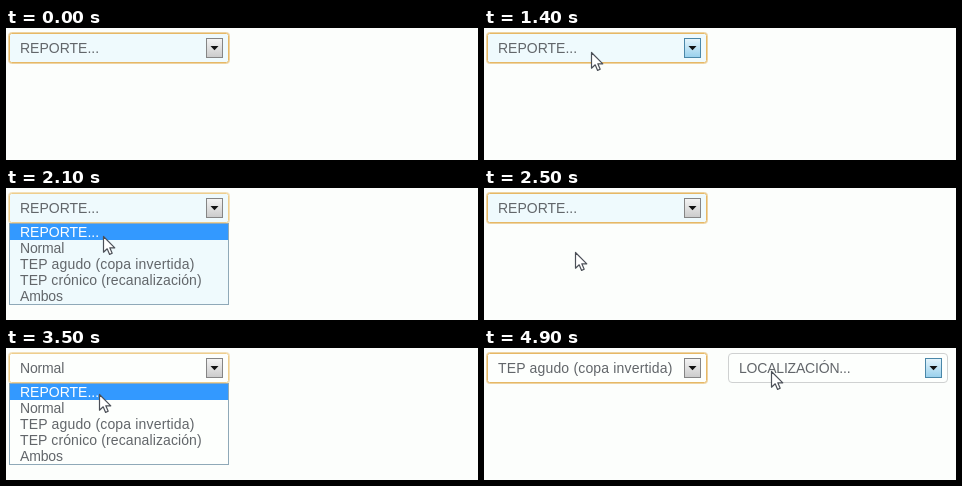
These frames come from a looping animation (472 by 132 pixels, 5000 ms). An HTML page:

```html
<!DOCTYPE html>
<html lang="es">
<head>
<meta charset="utf-8">
<title>Reporte</title>
<style>
html, body { margin: 0; width: 100%; height: 100%; overflow: hidden; background: #fcfefc; }
svg { display: block; width: 472px; height: 132px; }
text { font: 14px "Liberation Sans", Arial, sans-serif; fill: #62666a; white-space: pre; }
</style>
</head>
<body>
<svg viewBox="0 0 472 132">
  <defs>
    <linearGradient id="grey" x2="0" y2="1">
      <stop stop-color="#f4f4f4"/><stop offset="1" stop-color="#cbcbcb"/>
    </linearGradient>
    <linearGradient id="blue" x2="0" y2="1">
      <stop stop-color="#e6f5fc"/><stop offset="1" stop-color="#98d0ec"/>
    </linearGradient>
    <clipPath id="listClip"><rect id="listArea" x="2" y="35" width="223"/></clipPath>
    <clipPath id="placeClip"><rect id="placeArea" x="243" y="3" height="34"/></clipPath>
  </defs>

  <rect id="glow" x="2.5" y="4.5" width="221" height="31" rx="3" fill="none" opacity=".6"/>
  <rect id="box" x="3.5" y="5.5" width="219" height="29" rx="2"/>
  <text id="value" x="14" y="25"></text>
  <g id="button1"></g>

  <g id="place" clip-path="url(#placeClip)">
    <rect x="244.5" y="5.5" width="219" height="29" rx="3.5" fill="#fdfffd" stroke="#cfd1d1"/>
    <text x="255" y="25" letter-spacing="-.2">LOCALIZACIÓN...</text>
    <g id="button2"></g>
  </g>

  <g id="list" clip-path="url(#listClip)">
    <rect id="panel" x="3.5" y="35.5" width="219" height="81" stroke="#8fa9b8"/>
    <rect id="mark" x="4" width="218" height="16" fill="#3399ff"/>
    <g id="rows"></g>
  </g>

  <path id="cursor" d="M.5 .5V16.2L4.2 12.8L6.6 18.4L9.2 17.3L6.8 11.8H11.8Z" fill="#fff" stroke="#4c5058" stroke-width="1.2" stroke-linejoin="round"/>
</svg>
<script>
const LOOP = 5000, STEP = 100, ROW = 16, TOP = 36;
const $ = id => document.getElementById(id);
const set = (el, attrs) => { for (const k in attrs) el.setAttribute(k, attrs[k]); };
const show = (id, on) => { $(id).style.display = on ? "" : "none"; };
const ramp = (t, from, to) => Math.max(0, Math.min(1, (t - from) / (to - from)));
const mix = (a, b, p) => a + (b - a) * p;
const blend = (a, b, p) => `rgb(${a.map((v, i) => Math.round(mix(v, b[i], p)))})`;

const options = [
  ["REPORTE...", 0], ["Normal", -.15], ["TEP agudo (copa invertida)", .17],
  ["TEP crónico (recanalización)", .11], ["Ambos", -.15]
];
const rows = options.map(([label, gap], i) => {
  const row = document.createElementNS("http://www.w3.org/2000/svg", "text");
  set(row, { x: 14, y: TOP + 13 + ROW * i, "letter-spacing": gap });
  row.textContent = label;
  return $("rows").appendChild(row);
});

function makeButton(id, x) {
  $(id).innerHTML =
    `<rect x="${x + .5}" y="10.5" width="16" height="19"/>` +
    `<path d="M${x + 4.5} 18h8l-4 4.2z" fill="#111"/>`;
}
makeButton("button1", 200);
makeButton("button2", 441);
function paintButton(id, hot) {
  set($(id).firstChild, { fill: `url(#${hot ? "blue" : "grey"})`, stroke: hot ? "#4a87a8" : "#858585" });
}

// Where the pointer rests; it glides evenly in between
const rests = [
  { from: 700, to: 700, x: 130, y: 126 },
  { from: 1300, to: 1800, x: 107, y: 24 },
  { from: 2300, to: 2500, x: 91, y: 64 },
  { from: 3000, to: 3100, x: 97, y: 22 },
  { from: 4100, to: 4200, x: 86, y: 81 },
  { from: 4900, to: LOOP, x: 287, y: 23 }
];
const menus = [{ open: 1400, close: 2500 }, { open: 3100, close: 4200 }];

function pointer(t) {
  const n = Math.max(1, rests.findIndex(r => r.to > t));
  const a = rests[n - 1], b = rests[n], p = ramp(t, a.to, b.from);
  return [Math.round(mix(a.x, b.x, p)), Math.round(mix(a.y, b.y, p))];
}

function draw(t) {
  const [x, y] = pointer(t);
  const menu = menus.find(m => t >= m.open && t < m.close);
  const open = menu ? ramp(t, menu.open, menu.open + 300) : 0;
  const reveal = ramp(t, 4050, 4600);
  const chosen = menus.filter(m => t > m.close).length;
  const fill = blend([239, 250, 253], [253, 255, 253], ramp(t, 2500, 3000));
  const edge = blend([230, 184, 102], [238, 206, 142], open);

  $("value").textContent = options[chosen][0];
  set($("value"), { "letter-spacing": options[chosen][1] });
  set($("box"), { fill, stroke: edge });
  set($("glow"), { stroke: edge });
  paintButton("button1", t >= 700 && x < 224 && y < 46);
  paintButton("button2", x > 243 && y < 30);

  show("list", open > 0);
  set($("listArea"), { height: 83 * open });
  set($("panel"), { fill });
  const over = Math.floor((y - TOP) / ROW);
  const picked = rows[over] ? over : chosen;
  set($("mark"), { y: TOP + ROW * picked });
  rows.forEach((row, i) => { row.style.fill = i === picked ? "#fff" : ""; });

  show("place", reveal > 0);
  set($("placeArea"), { width: 223 * reveal });
  set($("place"), { opacity: mix(.3, 1, reveal) });

  show("cursor", t >= 700);
  set($("cursor"), { transform: `translate(${x} ${y})` });
}

const start = performance.now();
function tick() {
  const t = (performance.now() - start) % LOOP;
  draw(Math.floor(t / STEP) * STEP);
  requestAnimationFrame(tick);
}
tick();
</script>
</body>
</html>
```
